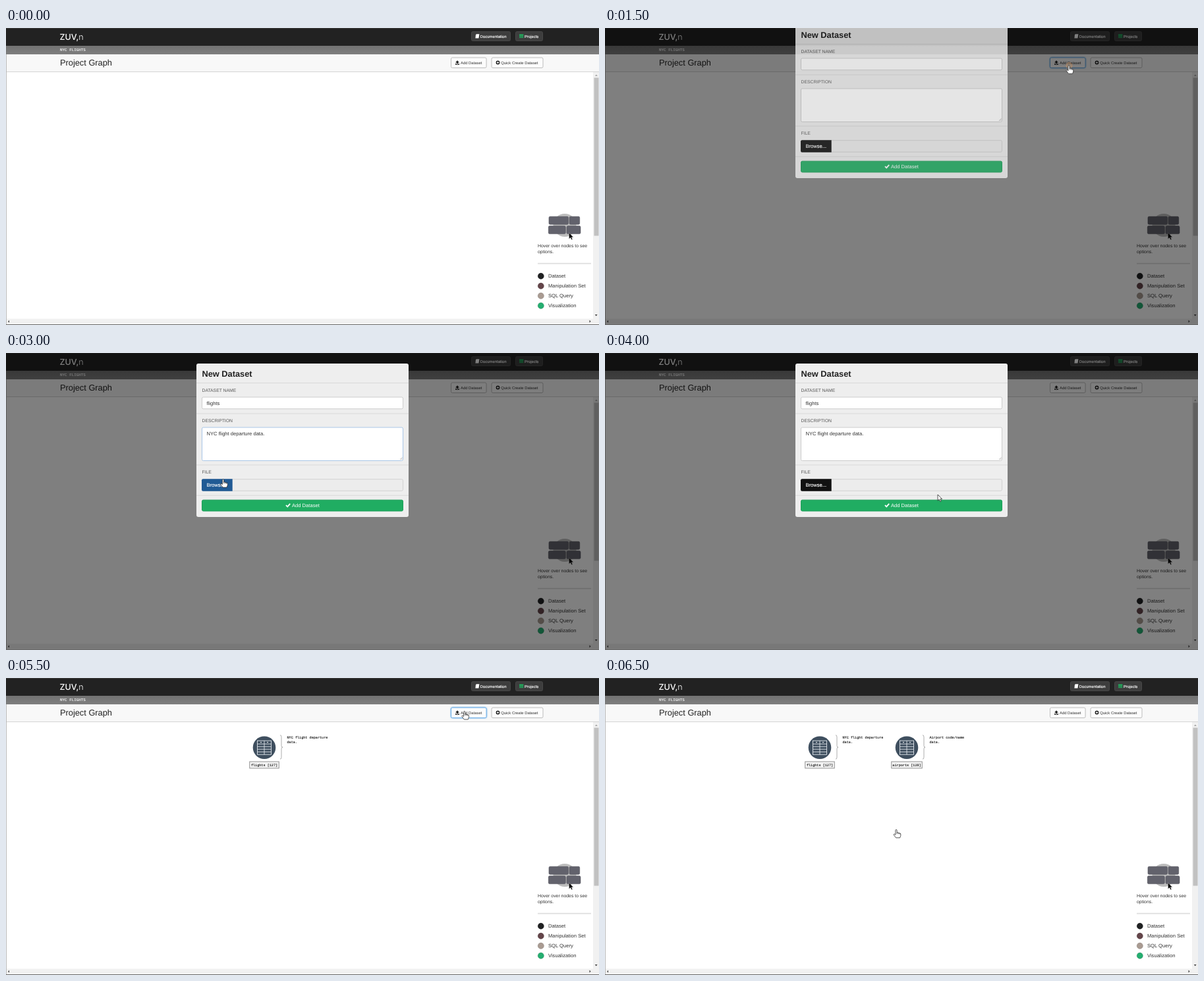
An HTML page that plays this animation: 900 px wide and 451 px high, repeating every 8 s.

```html
<!DOCTYPE html>
<html lang="en">
<head>
<meta charset="utf-8">
<title>Project Graph</title>
<style>
html, body { margin: 0; width: 100%; height: 100%; overflow: hidden; background: #fff; }
svg { display: block; width: 900px; height: 451px; }
text { font-family: "Liberation Sans", Arial, sans-serif; font-size: 7.6px; fill: #333; text-rendering: geometricPrecision; white-space: pre; }
.mono { font-family: "Liberation Mono", monospace; font-size: 5.17px; fill: #111; stroke: #111; stroke-width: .12; }
.small { font-size: 5.9px; }
.light { fill: #fff; stroke: #fff; stroke-width: .15; }
.label { font-size: 6.8px; fill: #555; }
.btn { fill: #fcfcfc; stroke: #bcbcbc; }
.dark-btn { fill: #3d3d3d; stroke: #484848; }
.field { fill: #fff; stroke: #ccc; }
.focus { stroke: #66a9e4; filter: drop-shadow(0 0 1.2px #66afe9); }
.fading { stroke: #a9c6e6; }
.rule { stroke: #d9d9d9; }
</style>
</head>
<body>
<svg viewBox="0 0 900 451">
  <defs>
    <linearGradient id="bar" x2="0" y2="1"><stop stop-color="#727272"/><stop offset="1" stop-color="#7e7e7e"/></linearGradient>
    <path id="arrow" d="M0 0V9.2L2.2 7.3L3.8 10.6L5.3 9.9L3.8 6.7H6.6Z"/>
    <path id="hand" d="M-1.1 1Q-1.1 0 0 0T1.1 1V4.3L2.3 4.1L3.2 4.8L4.5 4.7L5.1 5.5Q6.8 5.3 6.8 6.8V9L5.6 12.4H-.4L-3.8 7.9Q-3.9 6.3-2.5 6.7L-1.1 8ZM1.1 4.3V6.5M3.2 4.8V6.7M5.1 5.5V7"/>
    <path id="check" d="M0 3.6L1.4 2.2L2.9 3.7L6.2 0L7.6 1.3L3 6.5Z"/>
    <g id="table" fill="none" stroke="#dfe5ea" stroke-width=".9">
      <rect x="-10.5" y="-10.5" width="21" height="21"/>
      <path d="M-10.5-5.5H10.5M-10.5-1.5H10.5M-10.5 2.5H10.5M-10.5 6.5H10.5M0-10.5V10.5"/>
      <path d="M-6-8H-4M4-8H6" stroke-width="1.2"/>
    </g>
  </defs>

  <rect width="900" height="451" fill="#fff"/>
  <rect width="900" height="27" fill="#222"/>
  <path d="M0 .5H900" stroke="#3a3a3a"/>
  <rect y="27" width="900" height="13" fill="url(#bar)"/>
  <rect y="40" width="900" height="26" fill="#f8f8f8"/>
  <path d="M0 66.5H900" stroke="#d4d4d4"/>
  <text x="81.5" y="18" style="font:500 12.5px Inter,sans-serif;fill:#fff">ZUV,<tspan font-weight="300">n</tspan></text>
  <text class="mono" x="82" y="35.4" style="font-size:5.9px;fill:#fff;stroke:#fff">NYC FLIGHTS</text>
  <text x="82" y="57.3" style="font-size:12.8px;fill:#222">Project Graph</text>

  <rect class="dark-btn" x="706.5" y="5.5" width="59" height="14" rx="2"/>
  <path d="M713 10L714 9.2H718.4L717.4 15.4H712.4Z" fill="#fff"/>
  <text class="small light" x="719.8" y="14.6">Documentation</text>
  <rect class="dark-btn" x="773.5" y="5.5" width="41" height="14" rx="2"/>
  <path d="M779 10.2H785.4M779 12.3H785.4M779 14.4H785.4" stroke="#1fb45f" stroke-width="1.4"/>
  <text class="small light" x="787" y="14.6">Projects</text>

  <rect id="add" class="btn" x="675.5" y="45" width="53.6" height="15.5" rx="2"/>
  <path d="M685 49.3L688 52.4H686V54H684V52.4H682ZM682 54H683.4V54.7H686.6V54H688V55.8H682Z" fill="#222"/>
  <text class="small" x="690" y="54.7">Add Dataset</text>
  <rect class="btn" x="737" y="45" width="78" height="15.5" rx="2"/>
  <circle cx="746.5" cy="52.5" r="2.9" fill="#222"/>
  <path d="M744.8 52.5H748.2M746.5 50.8V54.2" stroke="#fff" stroke-width="1"/>
  <text class="small" x="751.2" y="54.7">Quick Create Dataset</text>

  <g id="graph"></g>

  <circle cx="848" cy="299.5" r="17.5" fill="#bdbdbd"/>
  <g fill="#62626c" stroke="#55555f" stroke-width=".6">
    <rect x="824" y="286.3" width="29.5" height="12" rx="1.8"/>
    <rect x="855" y="286.3" width="15.7" height="12" rx="1.8"/>
    <rect x="823.3" y="300.6" width="26" height="12" rx="1.8"/>
    <rect x="851" y="300.6" width="21" height="12" rx="1.8"/>
  </g>
  <use href="#arrow" x="854.5" y="311" fill="#000" stroke="#fff" stroke-width=".3"/>
  <text x="807" y="332.6" style="font-size:6.9px">Hover over nodes to see<tspan x="807" dy="9.4">options.</tspan></text>
  <path d="M807 357.7H888" stroke="#dedede" stroke-width="1.8"/>
  <g id="legend"></g>

  <rect x="891" y="67" width="9" height="375" fill="#f1f1f1"/>
  <rect x="892.5" y="75.5" width="7" height="240" fill="#c1c1c1"/>
  <rect y="441.5" width="900" height="8" fill="#f1f1f1"/>
  <path d="M894 73L895.9 70.6L897.8 73Z" fill="#a5a5a5"/>
  <path d="M893.8 435L895.7 437.4L897.6 435ZM885.5 443.6L887.6 445.5L885.5 447.4ZM5 443.8L3 445.7L5 447.6Z" fill="#444"/>
  <path d="M.5 40V450" stroke="#bbb"/>

  <rect id="shade" width="900" height="450" fill="#000" opacity=".5"/>
  <path d="M0 450.5H900" stroke="#666"/>

  <g id="status">
    <path d="M0 439.5H297Q298.5 439.5 298.5 441V449.5H0Z" fill="#fff" stroke="#b5b5b5"/>
    <text x="1.3" y="447.3" style="font-size:6.25px;fill:#555">Uploading (38%)...</text>
  </g>

  <g id="modal">
    <rect x="289" y="16" width="322" height="233" rx="3" fill="#eee"/>
    <path class="rule" d="M289 45.5H611M289 92H611M289 170H611M289 216.2H611"/>
    <text x="297.5" y="36" style="font-size:12.8px;font-weight:700;fill:#222">New Dataset</text>
    <text class="label" x="297.5" y="58.6">DATASET NAME</text>
    <rect id="nameBox" class="field" x="297.5" y="67" width="305" height="17.8" rx="2"/>
    <text id="name" x="304.5" y="78.5"></text>
    <text class="label" x="297.5" y="104.8">DESCRIPTION</text>
    <rect id="descBox" class="field" x="297.5" y="113" width="305" height="50.5" rx="2"/>
    <path d="M598 162L601.5 158.5M600 162L601.5 160.5" stroke="#888" stroke-width=".6"/>
    <text id="desc" x="304.5" y="124.6"></text>
    <path id="caret" d="M387 118V126" stroke="#222" stroke-width=".7"/>
    <text class="label" x="297.5" y="183">FILE</text>
    <rect x="297.5" y="191.7" width="305" height="17.6" rx="2" fill="#ececec" stroke="#d2d2d2"/>
    <path id="browse" d="M343.7 191.2V209.8H299Q297 209.8 297 207.8V193.2Q297 191.2 299 191.2Z"/>
    <text class="light" x="304.5" y="203.2">Browse...</text>
    <rect id="submit" x="297.5" y="223.2" width="305" height="16.8" rx="2"/>
    <g id="submitText">
      <use href="#check" x="424.3" y="228.2"/>
      <text x="434" y="234.3" style="fill:inherit">Add Dataset</text>
    </g>
  </g>

  <circle id="click" r="4.6" fill="#f3a25c" fill-opacity=".22" stroke="#d98a4c" stroke-opacity=".45" stroke-width=".8"/>
  <use id="cursor" fill="#fff" stroke="#222" stroke-width=".75" stroke-linejoin="round"/>
</svg>
<script>
const $ = id => document.getElementById(id);
const show = (id, on) => $(id).style.display = on ? "" : "none";

const legend = [["Dataset", "#1f2122"], ["Manipulation Set", "#64454a"], ["SQL Query", "#a99b92"], ["Visualization", "#25ae70"]];
$("legend").innerHTML = legend.map(([label, color], i) => {
  const y = 376.7 + 15 * i;
  return `<circle cx="811.8" cy="${y}" r="4.7" fill="${color}" stroke="#0003" stroke-width=".6"/>
    <text x="823" y="${y + 2.3}">${label}</text>`;
}).join("");

const flights = { label: "flights [127]", lines: ["NYC flight departure", "data."], width: 44.5 };
const airports = { label: "airports [128]", lines: ["Airport code/name", "data."], width: 46.5 };

const node = ({ label, lines, width }, x) => `<g transform="translate(${x} 105.7)">
  <circle r="17.3" fill="#3f4f5f"/><use href="#table"/>
  <path d="M24-19Q26-19 26-16V-3Q26-.5 28-.5Q26-.5 26 2V14.5Q26 17.5 24 17.5" fill="none" stroke="#999" stroke-width=".8"/>
  <text class="mono" x="34.5" y="-14">${lines[0]}<tspan x="34.5" dy="7.5">${lines[1]}</tspan></text>
  <rect x="${-width / 2}" y="21.3" width="${width}" height="10" fill="#f3f3f3" stroke="#888" stroke-width=".9"/>
  <text class="mono" y="28" text-anchor="middle">${label}</text></g>`;

const graphs = {
  none: "",
  one: node(flights, 392),
  two: node(flights, 326) + node(airports, 458)
};

const filled = { modal: true, name: "flights", desc: "NYC flight departure data." };

// Each entry holds from its start time until the next one.
const steps = [
  [0, {}],
  [500, { cursor: ["arrow", 611, 146] }],
  [1000, { cursor: ["hand", 704, 57] }],
  [1500, { modal: true, entering: true, addFocus: true, cursor: ["hand", 704, 57], click: true }],
  [2000, { modal: true, focus: "name", cursor: ["arrow", 706, 48] }],
  [2500, { modal: true, name: "flights", desc: "NYC flight de", focus: "desc", cursor: ["arrow", 465, 80] }],
  [3000, { ...filled, fading: true, browse: true, cursor: ["hand", 329.5, 191.7] }],
  [3500, { ...filled, cursor: ["arrow", 400, 170] }],
  [4000, { ...filled, cursor: ["arrow", 505, 215] }],
  [4500, { ...filled, uploading: true, cursor: ["hand", 451.5, 232.5], click: true }],
  [5000, { graph: "one", cursor: ["hand", 451.5, 232.5] }],
  [5500, { graph: "one", addFocus: true, cursor: ["hand", 695.7, 50.5] }],
  [6000, { modal: true, name: "airports", desc: "Airport code/name data.", focus: "desc", caret: true, cursor: ["arrow", 464.7, 62.5] }],
  [6500, { graph: "two", cursor: ["hand", 442, 230.3] }]
];

function render(s) {
  $("graph").innerHTML = graphs[s.graph || "none"];
  show("shade", s.modal);
  show("modal", s.modal);
  show("status", s.uploading);
  show("caret", s.caret);
  show("click", s.click);
  show("cursor", s.cursor);
  $("modal").setAttribute("transform", `translate(0 ${s.entering ? -21 : 0})`);
  $("modal").setAttribute("opacity", s.entering ? .8 : 1);
  $("add").setAttribute("class", s.addFocus ? "btn focus" : "btn");
  $("nameBox").setAttribute("class", s.focus === "name" ? "field focus" : "field");
  $("descBox").setAttribute("class", "field " + (s.focus === "desc" ? "focus" : s.fading ? "fading" : ""));
  $("name").textContent = s.name || "";
  $("desc").textContent = s.desc || "";
  $("browse").setAttribute("fill", s.browse ? "#205a94" : "#111");
  $("submit").setAttribute("fill", s.uploading ? "#e3e4e7" : "#20ad62");
  $("submit").setAttribute("stroke", s.uploading ? "#6fa8df" : "#1d9f59");
  $("submitText").setAttribute("fill", s.uploading ? "#222" : "#fff");
  if (s.cursor) {
    const [shape, x, y] = s.cursor;
    $("cursor").setAttribute("href", "#" + shape);
    $("cursor").setAttribute("transform", `translate(${x} ${y})`);
    $("click").setAttribute("transform", `translate(${x + .5} ${y})`);
  }
}

const start = performance.now();
let current;
function tick(now) {
  const t = Math.max(0, now - start) % 8000;
  const step = steps.findLast(([from]) => from <= t);
  if (step !== current) render((current = step)[1]);
  requestAnimationFrame(tick);
}
tick(start);
</script>
</body>
</html>
```
